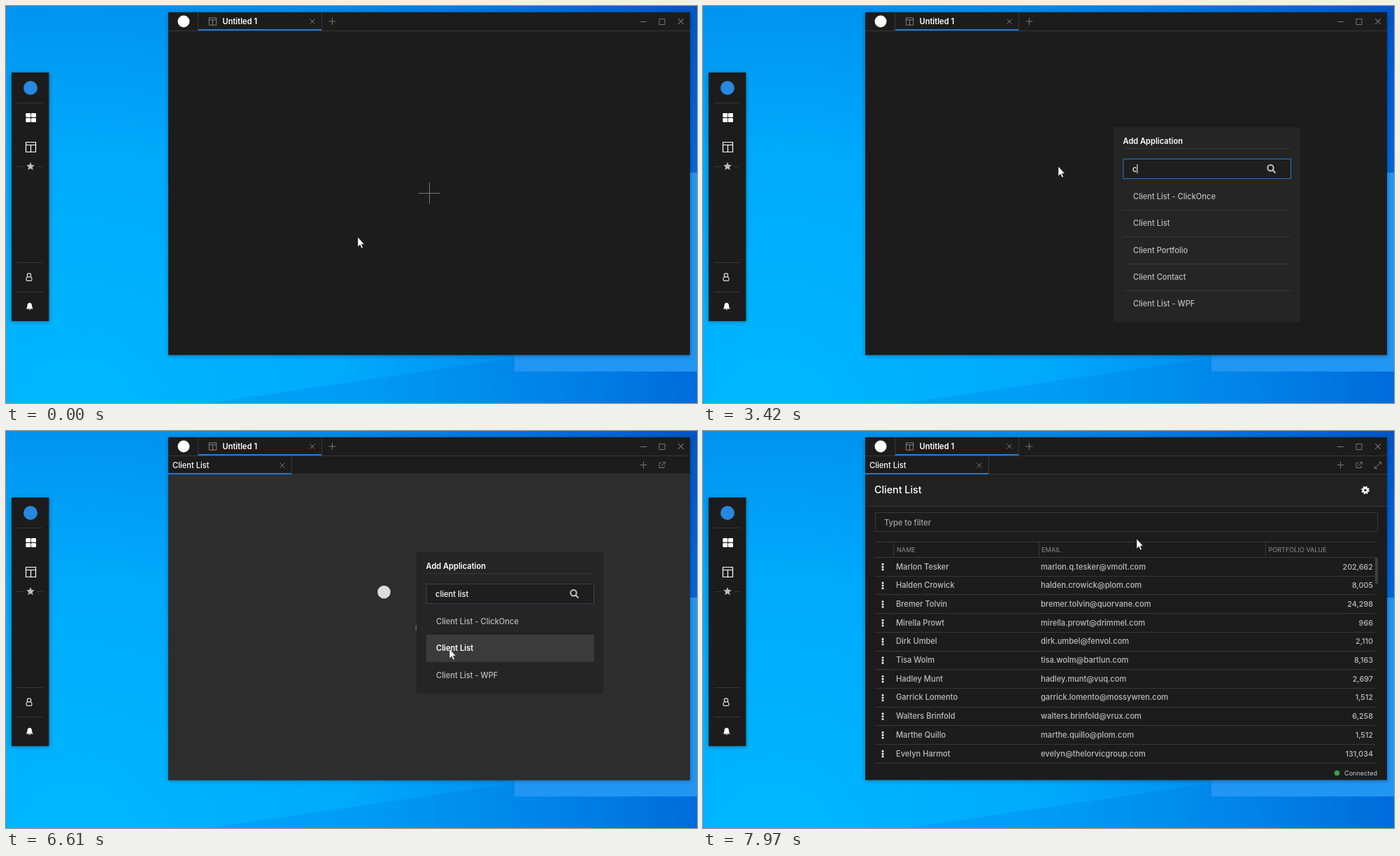
These frames come from a looping animation (988 px wide and 567 px high, 8000 ms). An HTML page:

```html
<!DOCTYPE html>
<html lang="en">
<head>
<meta charset="utf-8">
<title>Adding an application to a workspace</title>
<style>
html, body { margin: 0; width: 100%; height: 100%; overflow: hidden; background: #0098f2; }
svg { display: block; }
text { font: 500 11.1px Inter, "Open Sans", sans-serif; fill: #bdbdbd; white-space: pre; }
.bright, .hot text { fill: #fff; }
.bold, .hot text { font-weight: 600; }
.small { font-size: 9.1px; fill: #8c8c8c; font-weight: 400; }
.num { font-size: 10.8px; text-anchor: end; }
.rule { fill: none; stroke: #383838; }
.icon { fill: none; stroke: #777; }
.hover { fill: none; }
.hot .hover { fill: #3b3b3c; }
</style>
</head>
<body>
<svg width="988" height="567" viewBox="0 0 988 567">
  <defs>
    <radialGradient id="sky" gradientUnits="userSpaceOnUse" cx="100" cy="600" r="1150">
      <stop offset="0" stop-color="#00b9ff"/>
      <stop offset=".35" stop-color="#00a9fc"/>
      <stop offset=".6" stop-color="#008bec"/>
      <stop offset=".85" stop-color="#0064d8"/>
      <stop offset="1" stop-color="#0049b8"/>
    </radialGradient>
    <filter id="shadow"><feDropShadow dx="0" dy="1" stdDeviation="3" flood-opacity=".35"/></filter>
    <g id="template"><path d="M.5.5h14v14h-14zM.5 4.5h14M7.5 4.5v10"/></g>
    <path id="cross" d="M-3.5-3.5l7 7m0-7l-7 7"/>
    <path id="add" d="M-5 0H5M0-5V5"/>
  </defs>

  <rect width="988" height="567" fill="url(#sky)"/>
  <path d="M290 567L726 503H988V567z" fill="#0050d0" opacity=".15"/>
  <rect x="727" y="238" width="261" height="284" fill="#2196f3"/>

  <!-- dock -->
  <rect x="8" y="95" width="53.5" height="355" fill="#1e1e1e" filter="url(#shadow)"/>
  <circle cx="35" cy="117" r="10" fill="#2688e0"/>
  <path class="rule" d="M16 138.5h37M16 229.5h10M44 229.5h9M16 366.5h37M16 408.5h37"/>
  <g fill="#fff">
    <rect x="28.3" y="153" width="7" height="6" rx="1.3"/><rect x="36" y="153" width="7" height="6" rx="1.3"/>
    <rect x="28.3" y="160" width="7" height="6" rx="1.3"/><rect x="36" y="160" width="7" height="6" rx="1.3"/>
    <path d="M28.5 432.5q2-1.5 2-4.500q0-4 3.200-4.300q3.300.3 3.300 4.300q0 3 2 4.500zM32.300 433.300h3q-1.500 2-3 0z"/>
  </g>
  <use href="#template" x="28" y="194" fill="none" stroke="#fff" stroke-width="1.2"/>
  <path d="M35 223l1.700 4 4.200.3-3.200 2.800 1 4.200-3.700-2.300-3.700 2.300 1-4.200-3.200-2.800 4.200-.3z" fill="#c4bcb4"/>
  <g fill="none" stroke="#ddd" stroke-width="1.2">
    <circle cx="33" cy="384.500" r="2.700"/>
    <path d="M31 386.500q-2 1-2 3.500t1.500 2.300h5q1.500.2 1.500-2.300t-2-3.500"/>
  </g>

  <!-- window -->
  <rect x="232" y="9" width="746" height="489.500" fill="#1e1e1e" filter="url(#shadow)"/>
  <path class="rule" d="M232 35.500h746M274.500 9v26M451.500 9v26"/>
  <circle cx="254" cy="22" r="8.500" fill="#fff"/>
  <rect x="275" y="33" width="176" height="2" fill="#2079d0"/>
  <g class="icon">
    <use href="#template" stroke="#aaa" transform="translate(290 16.500) scale(.74)"/>
    <use href="#cross" x="438" y="22"/>
    <use href="#add" x="466.500" y="22"/>
    <path d="M907 22.500h9M934 18.500h8v8h-8z"/>
    <use href="#cross" x="965" y="22" transform="translate(-96.500 -2.200) scale(1.1)"/>
  </g>
  <text class="bright bold" x="309.500" y="26">Untitled 1</text>
  <path id="plus"/>

  <!-- opened application -->
  <g id="app">
    <g id="loader">
      <rect x="232" y="62" width="746" height="436.500" fill="#2d2d2d"/>
      <circle cx="540.500" cy="230" r="9.300" fill="#dcdcdc"/>
      <text class="small" x="585" y="284">Loading</text>
    </g>
    <path class="rule" d="M232 61.500h746M408.500 36v25"/>
    <rect x="232" y="60" width="176" height="2" fill="#2079d0"/>
    <text class="bright" x="238" y="52.500">Client List</text>
    <g class="icon">
      <use href="#cross" x="395" y="49"/>
      <use href="#add" x="911.500" y="48.500"/>
      <path d="M937 45.500h-3v7h7v-3M936.500 50l5.500-5.500M939 44.500h3.200v3.200"/>
    </g>
    <g id="page">
      <rect x="232" y="62" width="746" height="45" fill="#212121"/>
      <path class="rule" d="M232 107.500h746M246.500 116.500h718v27h-718z"/>
      <path class="icon" d="M961 53l8-8M966 44.500h3.500v3.500M960.500 50v3.500h3.500"/>
      <text class="bright" x="245" y="89" style="font-size:14.300px">Client List</text>
      <circle cx="947" cy="84.500" r="3.100" fill="none" stroke="#fff" stroke-width="2.600"/>
      <circle cx="947" cy="84.500" r="4.900" fill="none" stroke="#fff" stroke-width="1.800" stroke-dasharray="2.100 1.750"/>
      <text x="259" y="134.500" style="fill:#a5a5a5">Type to filter</text>
    </g>
    <g id="table">
      <path class="rule" d="M246 158.500h715M246 180.500h715M272.500 159v21M480.500 159v21M804.500 159v21"/>
      <text class="small" x="277" y="173">NAME</text>
      <text class="small" x="484" y="173">EMAIL</text>
      <text class="small" x="808.500" y="173">PORTFOLIO VALUE</text>
      <g id="rows"></g>
      <rect x="961" y="181" width="4" height="37" fill="#404040"/>
      <circle cx="906.500" cy="488.500" r="3.800" fill="#3fa244"/>
      <text class="small" x="917" y="492" style="fill:#c8c8c8">Connected</text>
    </g>
  </g>

  <!-- application picker -->
  <g id="panel">
    <rect id="sheet" x="587" y="173" width="267" fill="#252525"/>
    <text class="bright bold" x="600.500" y="196.500">Add Application</text>
    <path class="rule" d="M601 203.500h240"/>
    <rect id="field" x="601" y="218.500" width="239.500" height="28" fill="#1e1e1e"/>
    <g fill="none" stroke="#c4c4c4" stroke-width="2">
      <circle cx="811.500" cy="231.300" r="4.200"/><path d="M814.500 234.500l4 4"/>
    </g>
    <text id="hint" x="614" y="237" style="fill:#a0a0a0">Search application</text>
    <text id="query" class="bright" x="614" y="237"></text>
    <rect id="caret" y="226" width="1" height="13" fill="#fff"/>
    <g id="list"></g>
  </g>

  <circle id="click" r="10" fill="#e6dc00" opacity=".7"/>
  <path id="arrow" d="M0 0V14L3.200 11L5.400 16L7.400 15.100L5.200 10.200H9.300z" fill="#fff" stroke="#111" stroke-width=".5"/>
  <path id="beam" d="M-3-7h2.500l.5.500.5-.5H3M0-6.500v13M-3 7h2.500l.5-.5.5.5H3" fill="none" stroke="#fff"/>
</svg>
<script>
const LOOP = 8000, ROW = 26.7, ITEM = 38.3;
const $ = id => document.getElementById(id);
const show = (id, on) => $(id).style.display = on ? "" : "none";
const within = (t, a, b) => t >= a && t < b;

const people = [
  ["Marlon Tesker", "marlon.q.tesker@vmolt.com", "202,662"],
  ["Halden Crowick", "halden.crowick@plom.com", "8,005"],
  ["Bremer Tolvin", "bremer.tolvin@quorvane.com", "24,298"],
  ["Mirella Prowt", "mirella.prowt@drimmel.com", "966"],
  ["Dirk Umbel", "dirk.umbel@fenvol.com", "2,110"],
  ["Tisa Wolm", "tisa.wolm@bartlun.com", "8,163"],
  ["Hadley Munt", "hadley.munt@vuq.com", "2,697"],
  ["Garrick Lomento", "garrick.lomento@mossywren.com", "1,512"],
  ["Walters Brinfold", "walters.brinfold@vrux.com", "6,258"],
  ["Marthe Quillo", "marthe.quillo@plom.com", "1,512"],
  ["Evelyn Harmot", "evelyn@thelorvicgroup.com", "131,034"]
];
const apps = ["Client List - ClickOnce", "Client List", "Client Portfolio",
  "Client Contact", "Client List - WPF", "Portfolio Preview"];
const phrase = "client list";
const keyTimes = [3420, 3490, 3560, 3760, 3960, 4090, 4220, 4420, 4490, 4630, 4830];
const clicks = [[1300, 1440], [2000, 2170], [6400, 6540]];

// time, x, y of the pointer's hot spot
const track = [
  [70, 503, 330], [480, 565, 290], [820, 613, 266], [1090, 604, 265], [1650, 604, 265],
  [1860, 625, 235], [2280, 625, 235], [2560, 508, 229], [5300, 508, 229], [5700, 565, 337],
  [6120, 631, 303], [6400, 631, 303], [6600, 634, 311], [6900, 634, 311], [7020, 632, 311],
  [7620, 632, 311], [7970, 620, 154]
];

function pointer(t) {
  const i = track.findIndex(k => k[0] > t);
  if (i < 1) return track.at(i).slice(1);
  const [a, b] = [track[i - 1], track[i]], f = (t - a[0]) / (b[0] - a[0]);
  return [1, 2].map(n => a[n] + (b[n] - a[n]) * f);
}

$("rows").innerHTML = people.map(([name, mail, value], i) => {
  const y = 180.5 + ROW * i, base = y + 17;
  return `<g><rect class="hover" x="246" y="${y}" width="715" height="${ROW}"/>
    <path class="rule" d="M246 ${Math.round(y + ROW - .5) + .5}h715"/>
    <path d="M257 ${y + 8.500}v10.500" stroke="#fff" stroke-width="2.600" stroke-dasharray="2.600 1.200"/>
    <text x="276" y="${base}">${name}</text><text x="483" y="${base}">${mail}</text>
    <text class="num" x="958" y="${base}">${value}</text></g>`;
}).join("");

$("list").innerHTML = apps.map(name => `<g><rect class="hover" x="601" width="240" height="39"/>
  <path class="rule" d="M601 38.500h240"/><text x="615" y="23">${name}</text></g>`).join("");

function drawPanel(t, x, y) {
  const typed = phrase.slice(0, keyTimes.filter(k => k <= t).length);
  const focused = within(t, 2000, 6400);
  const found = apps.filter(a => a.toLowerCase().includes(typed));
  $("sheet").setAttribute("height", 87 + ITEM * found.length);
  $("field").setAttribute("stroke", within(t, 2070, 6400) ? "#2079d0" : "#3c4046");
  $("query").textContent = typed;
  show("hint", !typed);
  show("caret", focused && !within(t, 2560, 3090) && !within(t, 5360, 5890));
  $("caret").setAttribute("x", 614 + (typed ? $("query").getComputedTextLength() : 0));
  const over = within(x, 601, 841) ? Math.floor((y - 253) / ITEM) : -1;
  apps.forEach((name, i) => {
    const item = $("list").children[i], n = found.indexOf(name);
    item.style.display = n < 0 ? "none" : "";
    item.setAttribute("transform", `translate(0 ${Math.round(253 + ITEM * n)})`);
    item.setAttribute("class", n >= 0 && n === over ? "hot" : "");
    item.children[1].style.display = n === found.length - 1 ? "none" : "";
  });
}

function draw(t) {
  const [x, y] = pointer(t);
  const hovered = within(t, 700, 8000), r = hovered ? 10.5 : 15.5;
  $("plus").setAttribute("d", `M${605.5 - r} 267.500h${2 * r}M605.500 ${267.5 - r}v${2 * r}`);
  $("plus").setAttribute("stroke", hovered ? "#fff" : "#777");

  const panelOpen = within(t, 1440, 6750);
  show("panel", panelOpen);
  if (panelOpen) drawPanel(t, x, y);

  show("plus", t < 6540);
  show("app", t >= 6540);
  show("loader", t < 7020);
  show("page", t >= 7020);
  show("table", t >= 7360);
  const over = Math.floor((y - 180.5) / ROW);
  [...$("rows").children].forEach((row, i) => row.setAttribute("class", i === over ? "hot" : ""));

  const typing = within(t, 1840, 2330);
  const place = `translate(${x} ${y})`;
  for (const id of ["arrow", "beam", "click"]) $(id).setAttribute("transform", place);
  show("arrow", !typing);
  show("beam", typing);
  show("click", clicks.some(([a, b]) => within(t, a, b)));
}

const start = performance.now();
function tick() {
  draw((performance.now() - start) % LOOP);
  requestAnimationFrame(tick);
}
tick();
</script>
</body>
</html>
```
